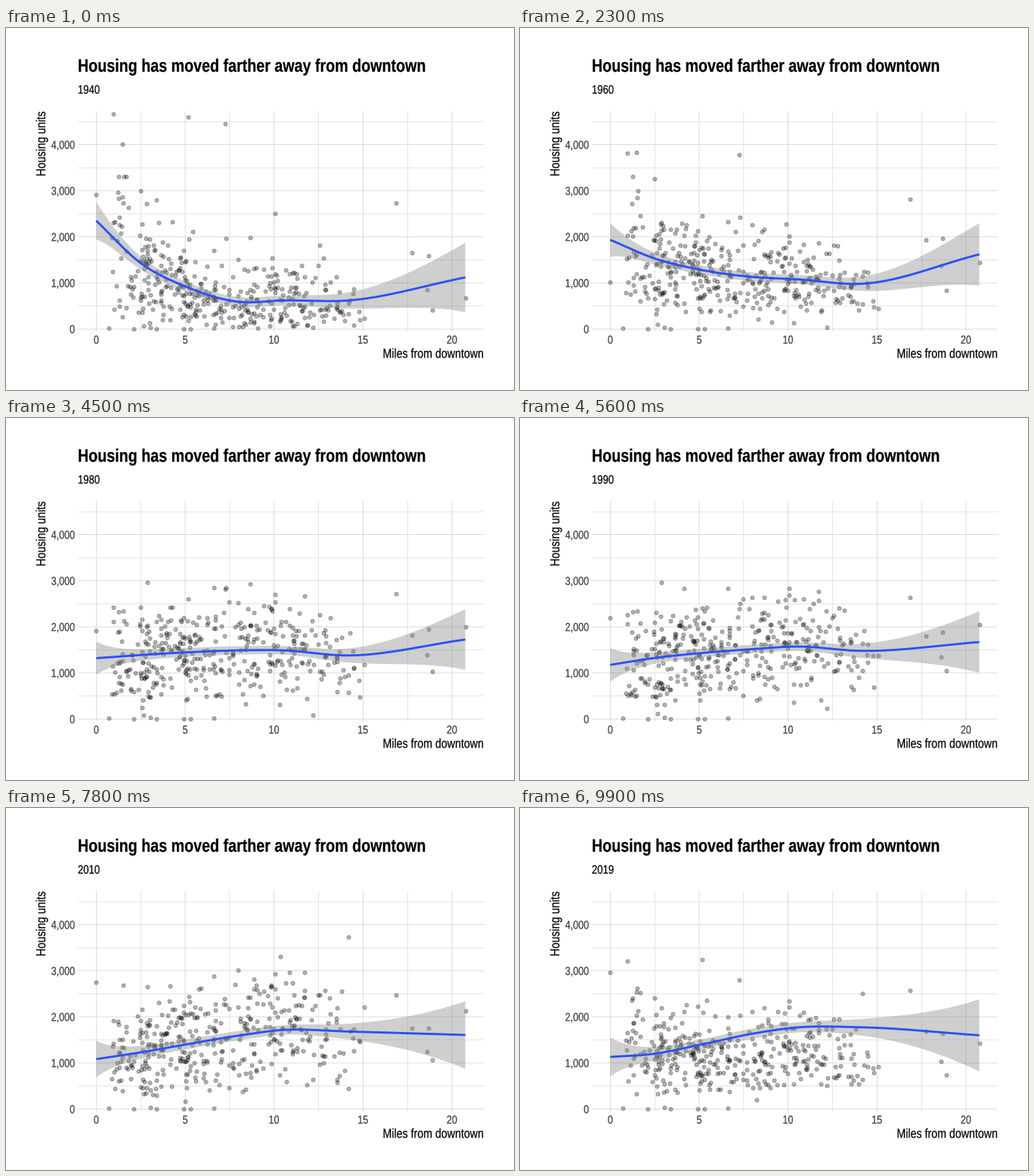
Recreate the animation shown at these times as a matplotlib script. Size 672x480 px, loop 10 s.

```python
import math

import matplotlib.pyplot as plt
import numpy as np
from matplotlib.animation import FuncAnimation
from matplotlib.patches import PathPatch, Polygon
from matplotlib.textpath import TextPath
from matplotlib.transforms import Affine2D

W, H, DPI = 672, 480, 96
PT = 72 / DPI  # points per pixel
LEFT, RIGHT, TOP, BOTTOM = 95, 632, 110, 402
X_MAX, Y_MAX = 20.75, 4685
NARROW = 0.82  # condensed face: one ratio for all lettering
GRID, TICK, BLUE, GREY = "#c2c2c2", "#3b3b3b", "#2a50ff", "#888888"

YEARS = [*range(1940, 2011, 10), 2019]
STARTS = [0, *range(11, 12), *range(23, 90, 11)]
FRAMES, STEP = 100, 100

# Smoothed trend at a few distances, for the years where it bends
KNOTS = np.array([0, 2.5, 5, 8, 10.5, 14, X_MAX])
TREND = {
    1940: [2350, 1430, 925, 590, 620, 615, 1120],
    1950: [2233, 1510, 1090, 780, 785, 730, 1395],
    1960: [1935, 1530, 1290, 1130, 1080, 980, 1620],
    1980: [1320, 1390, 1445, 1490, 1490, 1380, 1725],
    2000: [1030, 1260, 1410, 1545, 1655, 1580, 1615],
    2019: [1130, 1200, 1390, 1635, 1770, 1775, 1600],
}

# Standout tracts by miles: units in 1940, 1960, 1980 and 2019
STANDOUTS = {
    0: [2920, 1025, 1915, 3010],
    0.95: [4670, 3820, 2430, 1760],
    1.45: [4010, 3830, 1265, 1080],
    5.15: [4600, 2460, 2600, 1880],
    7.25: [4460, 3775, 2810, 1150],
    14.2: [335, 550, 580, 4685],
    16.85: [2740, 2810, 2720, 2400],
    17.77: [1650, 1930, 1825, 1730],
    18.6: [860, 1380, 1395, 1200],
    18.68: [1590, 1970, 1950, 1690],
    18.88: [410, 845, 1040, 1070],
    X_MAX: [670, 1440, 2000, 2170],
}
EMPTY = [0.72, 2.1, 3.05, 3.4, 4.9, 5.3, 6.6]  # tracts with almost no housing


def by_year(keys, values):
    """Rows of values interpolated to every year."""
    cols = np.array(values, float).T
    return np.array([np.interp(YEARS, keys, col) for col in cols]).T


def spline(x, y):
    """Cubic Hermite curve through (KNOTS, y)."""
    slope = np.gradient(y, KNOTS)
    i = np.clip(np.searchsorted(KNOTS, x, side="right") - 1, 0, len(KNOTS) - 2)
    h = KNOTS[i + 1] - KNOTS[i]
    t = (x - KNOTS[i]) / h
    return ((1 + 2 * t) * (1 - t) ** 2 * y[i] + t * (1 - t) ** 2 * h * slope[i]
            + t * t * (3 - 2 * t) * y[i + 1] + t * t * (t - 1) * h * slope[i + 1])


def half_width(x, year):
    """Confidence band: flares at both ends, tightest in the late 1970s."""
    far = np.clip((x - 9) / (X_MAX - 9), 0, 1)
    scale = 0.87 + 0.15 * ((year - 1977) / 40) ** 2
    return scale * (105 + 305 * np.exp(-x / 1.2) + 650 * far ** 2.7)


def make_cloud(trends, rng, n=385, keep=0.9):
    """Weibull scatter about the trend; each tract drifts slowly over time."""
    x = 0.75 + 14.8 * rng.beta(1.3, 1.85, n)
    z = rng.standard_normal(n)
    rows = []
    for year, trend in zip(YEARS, trends):
        even = min((year - 1940) / 30, 1)
        k = np.interp(x, [0, 9], [2.3 + 0.5 * even, 1.4 + 1.4 * even])
        u = np.array([math.erfc(v / math.sqrt(2)) / 2 for v in z])
        mean = spline(x, trend) * np.interp(x, [11, 13], [1, 0.85])
        rows.append(np.clip(1.11 * mean * (-np.log(u)) ** (1 / k), 5, 3300))
        z = keep * z + math.sqrt(1 - keep ** 2) * rng.standard_normal(n)
    return x, np.array(rows)


rng = np.random.default_rng(5)
trends = by_year(list(TREND), list(TREND.values()))
cloud_x, cloud_y = make_cloud(trends, rng)
stand_y = by_year([1940, 1960, 1980, 2019], np.array(list(STANDOUTS.values())).T)
empty_y = np.tile(rng.uniform(0, 40, len(EMPTY)), (len(YEARS), 1))
miles = np.concatenate([cloud_x, list(STANDOUTS), EMPTY])
units = np.hstack([cloud_y, stand_y, empty_y])

grid = np.linspace(0, X_MAX, 160)
lines = [spline(grid, row) for row in trends]
bands = []
for mid, year in zip(lines, YEARS):
    half = half_width(grid, year)
    bands.append(np.column_stack([np.r_[grid, grid[::-1]],
                                  np.r_[mid + half, (mid - half)[::-1]]]))

fig = plt.figure(figsize=(W / DPI, H / DPI), dpi=DPI, facecolor="white")
ax = fig.add_axes([LEFT / W, 1 - BOTTOM / H, (RIGHT - LEFT) / W, (BOTTOM - TOP) / H])
ax.axis("off")
ax.set_xlim(-0.05 * X_MAX, 1.05 * X_MAX)
ax.set_ylim(-0.01 * Y_MAX, 1.01 * Y_MAX)


def glyphs(s, size, weight="normal"):
    return TextPath((0, 0), s, size=size / PT,
                    prop={"family": "Liberation Sans", "weight": weight})


def label(s, x, y, size, align="left", weight="normal", color="black", turn=0):
    """Condensed text with its baseline at pixel (x, y) from the top left."""
    path = glyphs(s, size, weight)
    box = path.get_extents()
    anchor = {"left": 0, "center": (box.x0 + box.x1) / 2, "right": box.x1}[align]
    place = (Affine2D().translate(-anchor, 0).scale(NARROW, 1).rotate_deg(turn)
             .translate(x, H - y).scale(1 / DPI))
    return fig.add_artist(PathPatch(path, fc=color, ec=color, lw=0.2 * PT,
                                    transform=place + fig.dpi_scale_trans))


def rules(draw_line, stop, step):
    """Grid lines every step, heavier on each second one."""
    for i, v in enumerate(np.arange(0, stop, step)):
        draw_line(v, color=GRID, lw=(0.43 if i % 2 else 0.57) * PT,
                  snap=False, zorder=0)


rules(ax.axvline, 20.1, 2.5)
rules(ax.axhline, 4501, 500)

for v in range(0, 21, 5):
    px = LEFT + (v / X_MAX + 0.05) / 1.1 * (RIGHT - LEFT)
    label(str(v), px, 418.5, 11.5, "center", color=TICK)
for v in range(0, 4001, 1000):
    py = BOTTOM - (v / Y_MAX + 0.01) / 1.02 * (BOTTOM - TOP)
    label(f"{v:,}", 90.7, py + 5.5, 11.5, "right", color=TICK)

label("Housing has moved farther away from downtown", LEFT, 58, 18, weight="bold")
label("Miles from downtown", RIGHT - 1, 437.3, 13, "right")
label("Housing units", 52, 111, 13, "right", turn=90)
year_text = label("1940", LEFT, 87, 12)
year_paths = [glyphs(str(y), 12) for y in YEARS]

dots = ax.scatter(miles, units[0], s=(5.2 * PT) ** 2, lw=0.94 * PT,
                  fc=(0, 0, 0, 0.3), ec=(0, 0, 0, 0.3), zorder=2)
band = ax.add_patch(Polygon(bands[0], fc=GREY, alpha=0.4, lw=0, zorder=3))
curve, = ax.plot(grid, lines[0], color=BLUE, lw=2.845 * PT,
                 solid_capstyle="butt", zorder=4)


def draw(frame):
    i = int(np.searchsorted(STARTS, frame, side="right")) - 1
    j = (i + 1) % len(YEARS)
    # Only the dots move halfway, in the last step before the next year
    leaving = frame + 1 == [*STARTS, FRAMES][i + 1]
    y = (units[i] + units[j]) / 2 if leaving else units[i]
    dots.set_offsets(np.column_stack([miles, y]))
    band.set_xy(bands[i])
    curve.set_ydata(lines[i])
    year_text.set_path(year_paths[i])
    return dots, band, curve, year_text


anim = FuncAnimation(fig, draw, frames=FRAMES, interval=STEP,
                     repeat=True, repeat_delay=0, blit=False)
plt.show()
```
